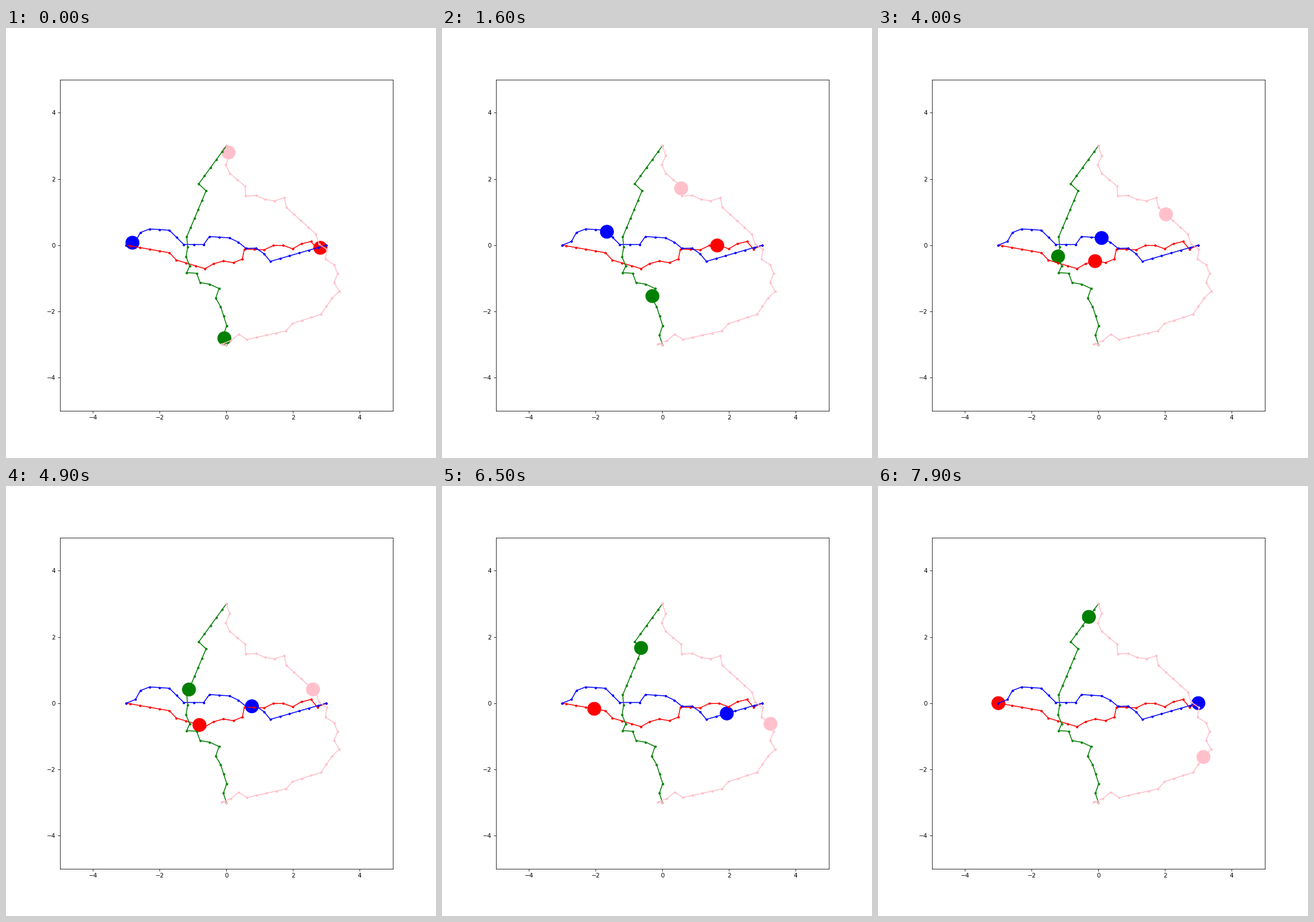
These frames come from a looping animation (748 by 748 pixels, 8 s). A matplotlib script:

```python
import numpy as np
import matplotlib.pyplot as plt
from matplotlib.animation import FuncAnimation
from matplotlib.patches import Circle

FRAMES = 80
INTERVAL = 100
STEP = 0.3             # spacing of waypoints along a path
START, RATE = 0.67, 0.284   # waypoints passed at first, and per frame

CORNERS = {
    "red": [(3, 0), (2.73, -.12), (2.54, .11), (2.25, .04), (1.99, -.11),
            (1.71, -.01), (1.41, -.01), (1.14, -.14), (.54, -.12),
            (.48, -.42), (.21, -.53), (-.09, -.48), (-.38, -.56),
            (-.64, -.71), (-1.5, -.45), (-1.71, -.23), (-3, 0)],
    "blue": [(-3, 0), (-2.73, .11), (-2.58, .38), (-2.3, .49), (-1.71, .45),
             (-1.28, .02), (-.68, .02), (-.51, .26), (.09, .22), (.36, .09),
             (.59, -.1), (.89, -.09), (1.13, -.26), (1.32, -.49), (3, 0)],
    "green": [(0, -3), (-.09, -2.72), (.01, -2.43), (-.17, -1.86),
              (-.32, -1.6), (-.22, -1.31), (-.5, -1.18), (-.79, -1.13),
              (-.89, -.85), (-1.19, -.83), (-1.1, -.63), (-1.21, -.35),
              (-1.16, -.05), (-1.19, .25), (-.61, 1.64), (-.83, 1.85),
              (0, 3)],
    "pink": [(0, 3), (.1, 2.7), (-.02, 2.43), (.1, 2.17), (.56, 1.78),
             (.58, 1.48), (.89, 1.5), (1.16, 1.38), (1.45, 1.34),
             (1.74, 1.43), (1.8, 1.14), (2.69, .33), (2.78, .03),
             (3.02, -.13), (2.97, -.42), (3.23, -.59), (3.34, -.86),
             (3.23, -1.13), (3.39, -1.39), (3.17, -1.6), (2.84, -2.09),
             (1.98, -2.37), (1.79, -2.59), (.62, -2.85), (.37, -2.69),
             (.14, -2.88), (-.14, -2.99), (0, -3)],
}


def waypoints(corners):
    """Walk from corner to corner in equal steps; the last step may be short."""
    corners = np.array(corners, float)
    points = [corners[0]]
    for a, b in zip(corners, corners[1:]):
        length = np.hypot(*(b - a))
        count = int(np.ceil(length / STEP - 0.25))
        points += [a + (b - a) * STEP * k / length for k in range(1, count)]
        points.append(b)
    return np.array(points)


def along(path, u):
    n = np.arange(len(path))
    return tuple(np.interp(u, n, axis) for axis in path.T)


fig, ax = plt.subplots(figsize=(10, 10), dpi=74.8)
ax.set_xlim(-5, 5)
ax.set_ylim(-5, 5)

agents = []
for color, corners in CORNERS.items():
    path = waypoints(corners)
    ax.plot(*path.T, marker=".", color=color)
    disc = ax.add_patch(Circle(path[0], 0.2, color=color))
    agents.append((disc, path))


def update(i):
    for disc, path in agents:
        disc.center = along(path, START + RATE * i)
    return [disc for disc, _ in agents]


anim = FuncAnimation(fig, update, frames=FRAMES, interval=INTERVAL,
                     repeat=True, repeat_delay=0)
plt.show()
```
